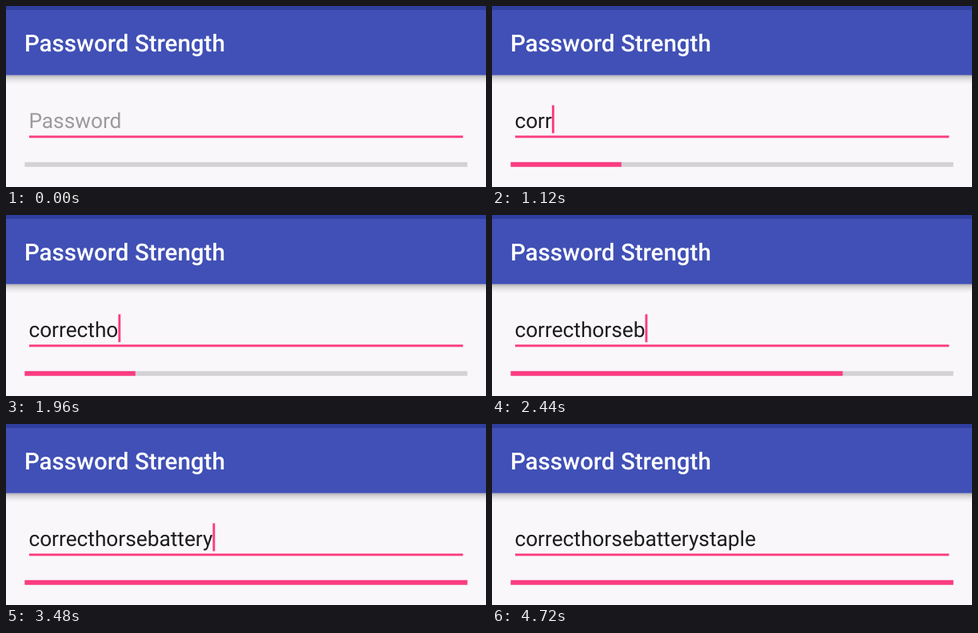
Write an HTML page that moves like this. It is 600 by 227 pixels and loops after 4.76 s.

```html
<!DOCTYPE html>
<html lang="en">
<head>
<meta charset="utf-8">
<title>Password Strength</title>
<style>
  html, body { margin: 0; width: 100%; height: 100%; overflow: hidden; background: #f9f7fa; }
  svg { display: block; width: 100%; height: 100%; }
  text { font-family: Roboto, sans-serif; text-rendering: geometricPrecision; white-space: pre; }
  .title { font-size: 29.5px; font-weight: 500; fill: #fff; }
  .field { font-size: 26.25px; }
  .pink { fill: #fb3c80; }
</style>
</head>
<body>
<svg viewBox="0 0 600 227">
  <defs>
    <linearGradient id="shade" x1="0" y1="0" x2="0" y2="1">
      <stop offset="0" stop-color="#000" stop-opacity=".29"/>
      <stop offset=".35" stop-color="#000" stop-opacity=".13"/>
      <stop offset=".7" stop-color="#000" stop-opacity=".04"/>
      <stop offset="1" stop-color="#000" stop-opacity="0"/>
    </linearGradient>
  </defs>
  <rect width="600" height="227" fill="#f9f7fa"/>
  <rect y="86.5" width="600" height="12" fill="url(#shade)"/>
  <rect width="600" height="86.7" fill="#4050b6"/>
  <rect width="600" height="5" fill="#303f9f"/>
  <text class="title" x="22.9" y="57.3">Password Strength</text>

  <text id="hint" class="field" x="28.4" y="152.6" fill="#9c9a9d">Password</text>
  <text id="typed" class="field" x="28.4" y="152.6" fill="#1d1c1f"></text>
  <rect id="caret" class="pink" y="124.5" width="2.9" height="35"/>
  <rect class="pink" x="29" y="162.5" width="542.3" height="2.9"/>

  <rect x="23.4" y="195.8" width="553.3" height="5.9" fill="#d3d1d4"/>
  <rect id="bar" class="pink" x="23.4" y="195.8" height="5.9"/>
</svg>
<script>
  const LOOP = 4760, LEFT = 28.4, TRACK = 553.3;
  const CARET_ON = 400, CARET_OFF = 4720;
  const phrase = "correcthorsebatterystaple";
  // time of each key press, ms
  const keys = [
    640, 800, 920, 1040, 1200, 1360, 1520, 1680, 1880, 2000, 2120, 2280,
    2440, 2600, 2760, 2960, 3080, 3240, 3400, 3520, 3680, 3880, 4000, 4080, 4200
  ];
  // lengths at which the strength score goes up by one
  const levels = [4, 10, 13, 16];

  const [hint, typed, caret, bar] =
    ["hint", "typed", "caret", "bar"].map(id => document.getElementById(id));
  const show = (el, on) => el.setAttribute("visibility", on ? "visible" : "hidden");

  function draw(t) {
    const count = keys.filter(k => k <= t).length;
    const score = levels.filter(n => n <= count).length;
    typed.textContent = phrase.slice(0, count);
    show(hint, count === 0);
    show(caret, t >= CARET_ON && t < CARET_OFF);
    caret.setAttribute("x", LEFT + (count ? typed.getComputedTextLength() : 0));
    bar.setAttribute("width", TRACK * score / levels.length);
  }

  const start = performance.now();
  function tick() {
    draw((performance.now() - start) % LOOP);
    requestAnimationFrame(tick);
  }
  tick();
</script>
</body>
</html>
```
